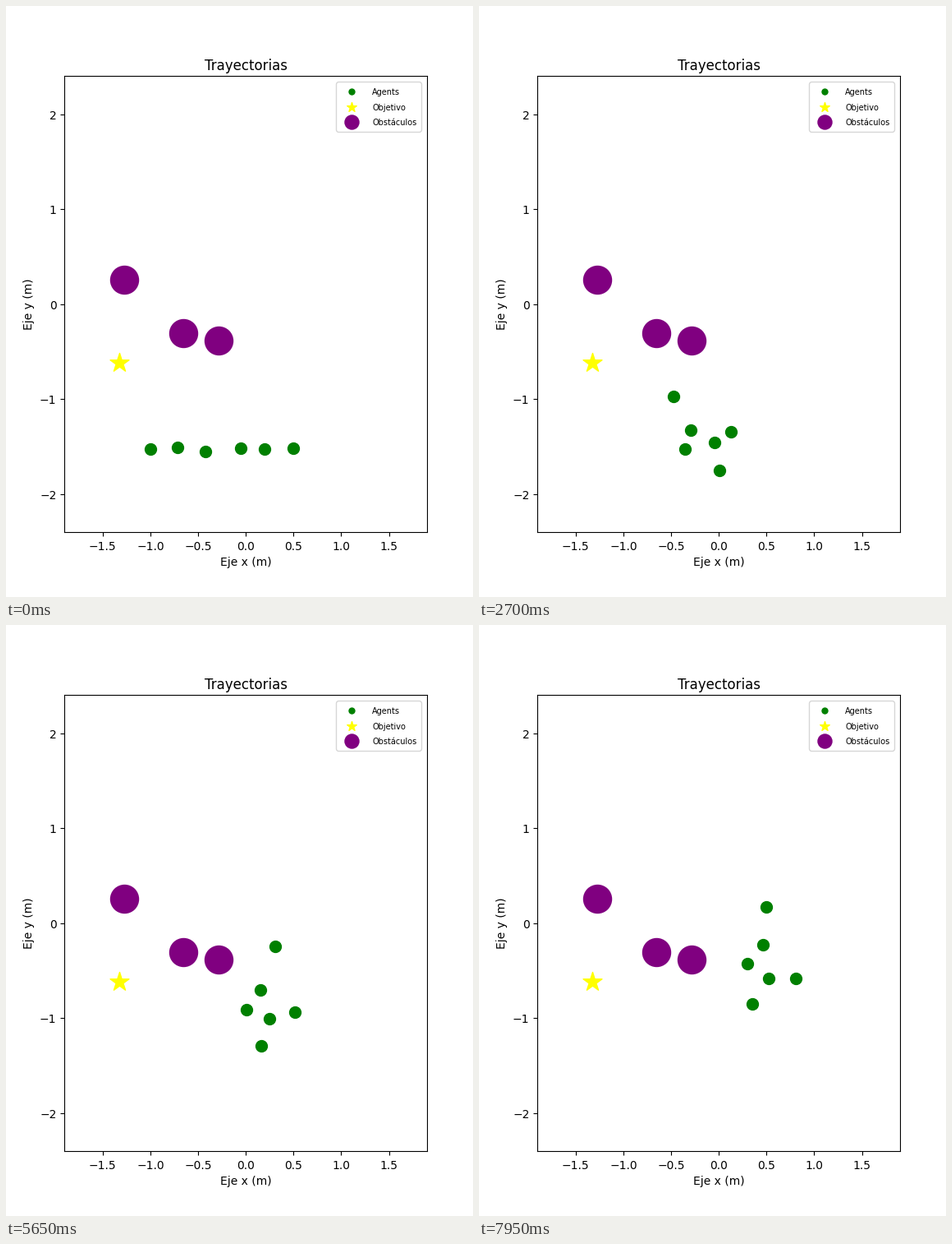
Animation, 569 px wide and 719 px high, one loop 8000 ms. Source, as a matplotlib script:

```python
import numpy as np
import matplotlib.pyplot as plt
from matplotlib.animation import FuncAnimation

W, H, DPI = 569, 719, 100
FRAMES, STEP = 160, 50

# The canvas cuts the fraction off; it only nudges how text is rounded
FIG_W, FIG_H = W + 0.49, H + 0.49

# Axes box in pixels, measured from the lower left corner
LEFT, BOTTOM, AX_W, AX_H = 71.25, 79.2, 441.75, 554.4
X_MAX, Y_MAX = 1.9, 2.4

# Poses of the swarm in stage pixels: (time in ms, x of each agent, y of each)
POSES = [
    (0, [176, 209, 243, 286, 315, 350], [539, 537, 542, 538, 539, 538]),
    (950, [206, 230, 252, 274, 286, 316], [546, 531, 557, 529, 554, 539]),
    (2700, [251, 237, 258, 287, 293, 307], [539, 475, 516, 531, 565, 518]),
    (4000, [258, 304, 272, 288, 287, 315], [508, 426, 483, 515, 549, 500]),
    (7950, [327, 350, 346, 353, 333, 386], [412, 343, 389, 430, 461, 430]),
]


def to_data(px, py):
    """Convert stage pixels (y down) to axes units, one row per point."""
    x = ((np.asarray(px) - LEFT) / AX_W * 2 - 1) * X_MAX
    y = ((H - np.asarray(py) - BOTTOM) / AX_H * 2 - 1) * Y_MAX
    return np.column_stack([x, y])


def mix(a, b, p):
    return np.array(a) * (1 - p) + np.array(b) * p


def agents_at(ms):
    """Glide from pose to pose; the sideways motion runs slightly ahead."""
    leg = max(k for k, pose in enumerate(POSES[:-1]) if pose[0] <= ms)
    (t0, x0, y0), (t1, x1, y1) = POSES[leg:leg + 2]
    p = (ms - t0) / (t1 - t0)
    ahead = p + 0.1 * np.sin(np.pi * p)
    return to_data(mix(x0, x1, ahead), mix(y0, y1, p))


def dots(points, marker, color, size, label):
    return ax.scatter(*points.T, s=size, marker=marker, color=color,
                      linewidths=1, label=label)


fig = plt.figure(figsize=(FIG_W / DPI, FIG_H / DPI), dpi=DPI)
ax = fig.add_axes([LEFT / FIG_W, BOTTOM / FIG_H, AX_W / FIG_W, AX_H / FIG_H])
ax.set_xlim(-X_MAX, X_MAX)
ax.set_ylim(-Y_MAX, Y_MAX)
ax.tick_params(axis="x", pad=3.86)
ax.set_title("Trayectorias", pad=5.64)
ax.set_xlabel("Eje x (m)")
ax.set_ylabel("Eje y (m)")

agents = dots(agents_at(0), "o", "green", 100, "Agents")
dots(to_data([138], [434]), "*", "yellow", 300, "Objetivo")
dots(to_data([144, 216, 259], [333, 398, 407]), "o", "purple", 600,
     "Obstáculos")

legend = ax.legend(loc="upper right", markerscale=0.5)
plt.setp(legend.get_texts(), fontsize=7)


def update(i):
    agents.set_offsets(agents_at(i * STEP))
    return agents,


anim = FuncAnimation(fig, update, frames=FRAMES, interval=STEP, repeat=True,
                     repeat_delay=0)
plt.show()
```
